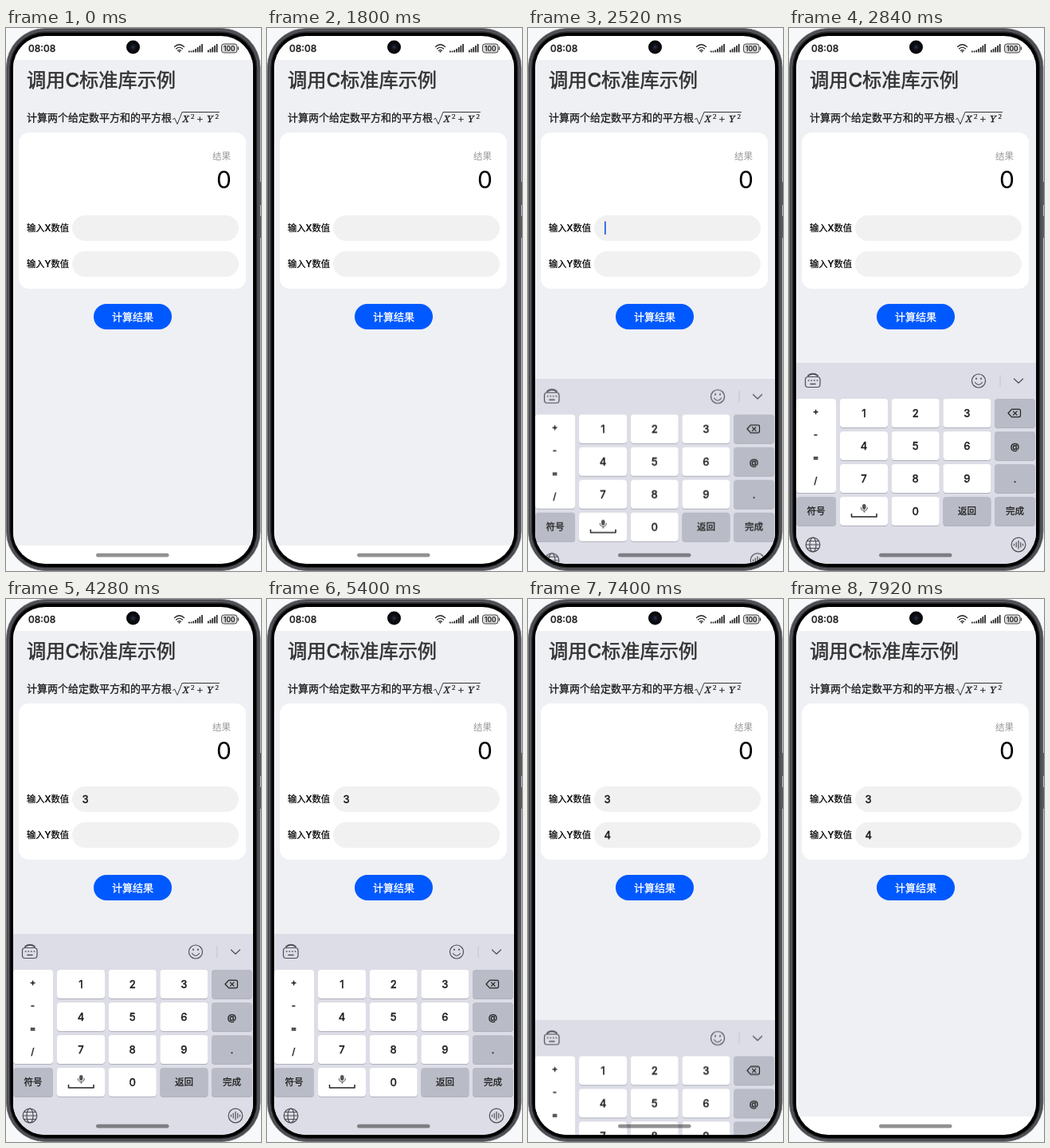
Animation of 320 by 681 pixels, one loop 8000 ms. Source, as an HTML page:

```html
<!DOCTYPE html>
<html lang="zh-CN">
<head>
<meta charset="utf-8">
<title>调用C标准库示例</title>
<style>
  html, body { margin: 0; width: 100%; height: 100%; overflow: hidden; background: #f7f8fa; }
  svg { display: block; width: 320px; height: 681px; }
  /* the thin stroke gives the regular CJK face a medium weight */
  text {
    font-family: Inter, "Noto Sans CJK SC", "Noto Sans CJK", sans-serif;
    font-weight: 500; color: #1c1c1c;
    fill: currentColor; stroke: currentColor; stroke-width: .022em;
  }
  .mid { text-anchor: middle; }
  .end { text-anchor: end; }
  .plain { font-weight: 400; stroke: none; }
  .math { font: italic 13.5px "Liberation Serif", "Noto Serif", serif; }
  .upright { font-style: normal; }
  .sup { font-size: 9px; font-style: normal; }
  .line { fill: none; stroke: #4d4f55; stroke-width: 1.2; stroke-linecap: round; stroke-linejoin: round; }
  .dark { stroke: #222; }

  .keyboard, .caret, .typed, .press { animation: 8s -10ms infinite step-end; }
  .caret, .typed, .press { opacity: 0; }
  /* critically damped spring */
  .keyboard {
    animation-name: slide;
    animation-timing-function: linear(0, .048 5%, .154 10%, .28 15%, .405 20%, .617 30%,
      .766 40%, .862 50%, .92 60%, .955 70%, .975 80%, .988 90%, 1);
  }
  .caret { fill: #1a5fe0; animation-name: caret; }
  .x { animation-name: typeX; }
  .y { animation-name: typeY; }
  .press3 { animation-name: press3; }
  .press4 { animation-name: press4; }

  @keyframes slide {
    0%, 25.5%, 100% { transform: translateY(262px); }
    35.5%, 90.75% { transform: translateY(0); }
  }
  @keyframes caret {
    0%, 35.5% { opacity: 0; }
    29%, 41.5% { opacity: 1; transform: none; }
    47%, 60% { opacity: 1; transform: translate(7px, 0); }
    53.5% { opacity: 0; }
    61%, 74.5% { opacity: 1; transform: translate(0, 45px); }
    67.5% { opacity: 0; }
    77.5% { opacity: 1; transform: translate(7px, 45px); }
    84%, 100% { opacity: 0; }
  }
  @keyframes typeX { 0% { opacity: 0; } 47%, 100% { opacity: 1; } }
  @keyframes typeY { 0% { opacity: 0; } 77.5%, 100% { opacity: 1; } }
  @keyframes press3 { 0%, 51%, 100% { opacity: 0; } 47% { opacity: .1; } }
  @keyframes press4 { 0%, 77.5%, 100% { opacity: 0; } 74.5% { opacity: .1; } }
</style>
</head>
<body>
<svg viewBox="0 0 320 681">
  <defs>
    <clipPath id="screen"><rect x="9" y="10" width="301" height="662" rx="40"/></clipPath>
    <radialGradient id="lens">
      <stop offset="0" stop-color="#2b3550"/>
      <stop offset=".35" stop-color="#10131c"/>
      <stop offset="1" stop-color="#000"/>
    </radialGradient>
  </defs>

  <!-- phone body -->
  <path d="M319 193V222M319 236V263" stroke="#333" stroke-width="2"/>
  <rect x=".5" y=".5" width="318.500" height="680" rx="49" fill="#4a4b50" stroke="#77797e"/>
  <rect x="3.500" y="3.500" width="312.500" height="674.500" rx="46" fill="#2c2d30" stroke="#606267"/>
  <rect x="5.500" y="6" width="308.500" height="670" rx="44" fill="#000"/>

  <g clip-path="url(#screen)">
    <rect width="320" height="681" fill="#fff"/>
    <rect y="40" width="320" height="609" fill="#eff0f4"/>

    <!-- status bar -->
    <text x="28" y="30" font-size="12">08:08</text>
    <circle cx="159.500" cy="24" r="8.500" fill="url(#lens)"/>
    <path class="line dark" stroke-width="1.400" d="M211.500 23.500Q217.500 18 223.500 23.500M213.500 26Q217.500 22.500 221.500 26M215.500 28.300Q217.500 26.700 219.500 28.300"/>
    <circle cx="217.500" cy="29.600" r="1.100" fill="#222"/>
    <g id="signals" fill="#222"></g>
    <rect x="270.500" y="20" width="19.500" height="11" rx="3" fill="#dcdcdc" stroke="#444"/>
    <rect x="290.800" y="23.500" width="1.300" height="4" rx=".6" fill="#444"/>
    <text class="mid" x="280.200" y="28.700" font-size="8.500" font-weight="700">100</text>

    <!-- page -->
    <text x="26" y="73.500" font-size="24.200" style="color:#333">调用C标准库示例</text>
    <text x="26" y="117" font-size="13">计算两个给定数平方和的平方根</text>
    <path class="line dark" d="M209.500 114.500L211.500 113L215 120.500L221 105.500H267.500" style="stroke-width:.9"/>
    <text class="math" x="221.500" y="118">X</text>
    <text class="math sup" x="232" y="114" style="font-size:9px;font-style:normal">2</text>
    <text class="math upright" x="239.500" y="118.500" style="font-style:normal">+</text>
    <text class="math" x="252" y="118">Y</text>
    <text class="math sup" x="262.500" y="114" style="font-size:9px;font-style:normal">2</text>

    <rect x="16" y="131" width="285" height="196" rx="13" fill="#fff"/>
    <text class="end plain" x="282" y="165" font-size="11.500" style="color:#999">结果</text>
    <text class="end plain" x="283" y="201" font-size="30" style="color:#000">0</text>
    <text x="26" y="254.500" font-size="11.300" style="color:#000">输入X数值</text>
    <text x="26" y="299.500" font-size="11.300" style="color:#000">输入Y数值</text>
    <rect x="83" y="235" width="209" height="32" rx="16" fill="#f1f1f1"/>
    <rect x="83" y="280" width="209" height="32" rx="16" fill="#f1f1f1"/>
    <text class="typed x" x="95.500" y="255.700" font-size="13">3</text>
    <text class="typed y" x="95.500" y="300.700" font-size="13">4</text>
    <rect class="caret" x="96" y="242.500" width="1.700" height="16.500"/>
    <rect x="110" y="346" width="98" height="32" rx="16" fill="#0059ff"/>
    <text class="mid" x="159" y="366.500" font-size="13" style="color:#fff">计算结果</text>

    <g class="keyboard">
      <rect y="420" width="320" height="270" fill="#dcdde6"/>
      <!-- toolbar -->
      <g class="line">
        <rect x="20.500" y="437.500" width="18.500" height="13" rx="3.500"/>
        <path d="M24 436Q30 431.500 36 436" stroke-width="2"/>
        <path d="M24.500 442h.4m3.200 0h.4m3.200 0h.4m3.200 0h.4M27 446.500h6" stroke-width="1.600"/>
        <circle cx="238" cy="442.500" r="8.500"/>
        <path d="M233.500 444.500Q238 450.500 242.500 444.500"/>
        <path d="M235 439.500v.5M241 439.500v.5" stroke-width="1.800"/>
        <path d="M282.500 440l5.500 5.200l5.500-5.200"/>
        <path d="M265 435.500v14" stroke="#c3c5ce" stroke-width="1"/>
      </g>
      <g id="keys"></g>
      <rect class="press press3" x="193.500" y="465" width="60" height="36" rx="4"/>
      <rect class="press press4" x="64" y="506" width="60" height="36" rx="4"/>
      <!-- key icons -->
      <g class="line dark">
        <path d="M279.500 478.200h9q2 0 2 2v5.600q0 2-2 2h-9l-4.500-4.800zM281.500 480.800l4.500 4.500m0-4.500l-4.500 4.500"/>
        <path d="M78.500 609v4h31.500v-4" stroke-linecap="butt" stroke-width="1.500"/>
      </g>
      <rect x="92" y="597" width="4.500" height="7" rx="2.250" fill="#555"/>
      <path class="line" d="M90.300 601.500q0 4 4 4t4-4M94.300 605.500v2" style="stroke-width:1"/>
      <!-- bottom row -->
      <g class="line">
        <circle cx="30" cy="648" r="8.800"/>
        <ellipse cx="30" cy="648" rx="4" ry="8.800"/>
        <path d="M21.500 648h17M23 643.500h14M23 652.500h14"/>
        <circle cx="288" cy="648" r="8.800"/>
        <path d="M282.500 647v2M285.200 645v6M288 643v10M290.800 645v6M293.500 647v2"/>
      </g>
    </g>
    <rect x="113" y="658.800" width="91.500" height="4.800" rx="2.400" fill="#000" opacity=".43"/>
  </g>
</svg>
<script>
  const NS = "http://www.w3.org/2000/svg";

  function add(parent, tag, attrs, text = "") {
    const el = document.createElementNS(NS, tag);
    for (const name in attrs) el.setAttribute(name, attrs[name]);
    el.textContent = text;
    parent.append(el);
  }

  const keys = document.getElementById("keys");
  const label = (x, y, text, size) =>
    add(keys, "text", { class: "mid", x, y, "font-size": size }, text);

  function key(x, y, width, height, fill) {
    const box = { x, width, height, rx: 4 };
    add(keys, "rect", { ...box, y: y + 1, fill: "#aeb0ba" });
    add(keys, "rect", { ...box, y, fill });
  }

  key(9, 465, 50, 118, "#fff");
  [..."+-=/"].forEach((sign, i) => label(33.5, 484.5 + i * 29.2, sign, 11.5));

  const columns = [[9, 50], [64, 60], [128.7, 60], [193.4, 60], [258, 51]];
  const rows = [
    [null, "1", "2", "3", ""],
    [null, "4", "5", "6", "@"],
    [null, "7", "8", "9", "."],
    ["符号", "", "0", "返回", "完成"]
  ];
  rows.forEach((row, r) => row.forEach((text, c) => {
    if (text === null) return;
    const [x, width] = columns[c];
    const y = 465 + r * 41;
    const word = text.length > 1;
    key(x, y, width, 36, word || c === 4 ? "#b9bbc6" : "#fff");
    label(x + width / 2, y + (word ? 22 : 22.7), text, word || c === 4 ? 11.5 : 13);
  }));

  const signals = document.getElementById("signals");
  function bars(x, heights) {
    heights.forEach((height, i) =>
      add(signals, "rect", { x: x + i * 2.7, y: 30.5 - height, width: 1.7, height, rx: .5 }));
  }
  bars(229, [2, 2, 3, 4.5, 6.5, 8.5, 10.5]);
  bars(253, [3, 4.5, 6.5, 8.5, 10.5]);
</script>
</body>
</html>
```
